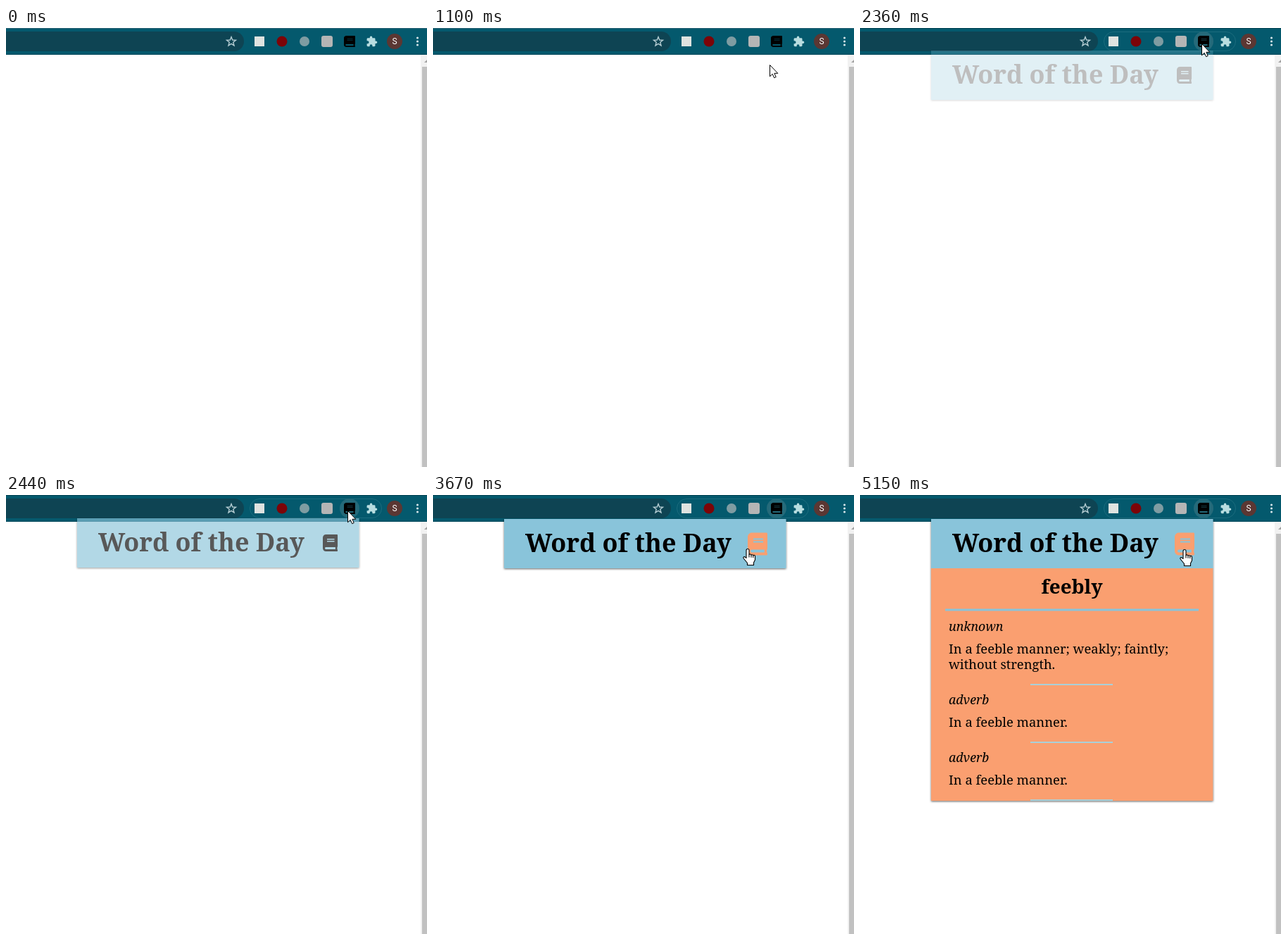
An HTML page for the animation above (8 s loop, 598 px wide and 623 px high).

```html
<!DOCTYPE html>
<html lang="en">
<head>
<meta charset="utf-8">
<title>Word of the Day</title>
<style>
  html, body { margin: 0; width: 100%; height: 100%; overflow: hidden; background: #fff; }
  svg { display: block; width: 598px; height: 623px; }
  .serif { font-family: "Noto Serif", Georgia, serif; }
  .title { font-size: 35.9px; font-weight: 700; }
  .word { font-size: 27.8px; font-weight: 700; text-anchor: middle; }
  .body { font-size: 18.4px; }
  .kind { font-size: 17.8px; font-style: italic; }
  .avatar { font: 12px Roboto, sans-serif; text-anchor: middle; fill: #fff; }
</style>
</head>
<body>
<svg viewBox="0 0 598 623" xmlns="http://www.w3.org/2000/svg">
  <defs>
    <path id="book" fill-rule="evenodd" d="M448 360V24c0-13.3-10.7-24-24-24H96C43 0 0 43 0 96v320c0 53 43 96 96 96h328c13.3 0 24-10.7 24-24v-16c0-7.5-3.5-14.3-8.9-18.7-4.2-15.4-4.2-59.3 0-74.7 5.4-4.3 8.9-11.1 8.9-18.6zM128 128h224v32H128zM128 192h224v32H128zM381.4 448H96c-17.7 0-32-14.3-32-32s14.4-32 32-32h285.4c-1.9 17.1-1.9 46.9 0 64z"/>
    <filter id="shade" x="-5%" y="-20%" width="110%" height="150%">
      <feDropShadow dx="0" dy="1" stdDeviation="1.4" flood-color="#000" flood-opacity=".6"/>
    </filter>
  </defs>

  <!-- page and scrollbar -->
  <rect width="598" height="623" fill="#fff"/>
  <rect x="589" y="38" width="9" height="585" fill="#f1f1f1"/>
  <rect x="591" y="55" width="7" height="568" fill="#c1c1c1"/>
  <path d="M594 49l4-4v4z" fill="#a3a3a3"/>

  <!-- toolbar -->
  <rect width="598" height="38" fill="#04596d"/>
  <rect id="edge" width="598" height="1"/>
  <rect y="37" width="598" height="1" fill="#03485a"/>
  <path d="M0 5H324a14 14 0 0 1 0 28H0z" fill="#0e4453"/>
  <path id="star" fill="none" stroke="#b4ccd2" stroke-width="1.4"/>
  <g id="active">
    <rect x="346.5" y="5.5" width="187" height="27" rx="13.5" fill="none" stroke="#1c6c7e"/>
    <circle cx="488" cy="19" r="14" fill="#256a7a"/>
  </g>
  <rect x="353" y="12" width="14" height="14" fill="#dfe3e0"/>
  <circle cx="392" cy="19" r="7.5" fill="#7c0408"/>
  <circle cx="424" cy="19" r="7" fill="#7f9ca2"/>
  <rect x="448" y="11" width="16" height="16" rx="3" fill="#b5b5b5"/>
  <use href="#book" transform="translate(480 11) scale(.0357 .03125)"/>
  <path d="M484 15.5h9M484 17.5h9" stroke="#000" stroke-opacity=".5"/>
  <path transform="translate(511.2 10.8) scale(.7)" fill="#b8dde0" d="M20.5 11H19V7c0-1.1-.9-2-2-2h-4V3.5a2.5 2.5 0 0 0-5 0V5H4c-1.1 0-2 .9-2 2v3.8h1.5a2.7 2.7 0 0 1 0 5.4H2V20c0 1.1.9 2 2 2h3.8v-1.5a2.7 2.7 0 0 1 5.4 0V22H17c1.1 0 2-.9 2-2v-4h1.5a2.5 2.5 0 0 0 0-5z"/>
  <circle cx="552" cy="19" r="11" fill="#5b3733"/>
  <text class="avatar" x="552" y="23.3">S</text>
  <g fill="#d3e4e8">
    <circle cx="584.5" cy="14" r="1.6"/><circle cx="584.5" cy="19" r="1.6"/><circle cx="584.5" cy="24" r="1.6"/>
  </g>

  <!-- popup -->
  <g id="popup" class="serif">
    <rect id="panel" x="101" y="34" width="400.5" height="70" fill="#89c4da" filter="url(#shade)"/>
    <text class="title" x="131" y="81">Word of the Day</text>
    <use id="icon" href="#book"/>
    <g id="entry">
      <rect x="101" y="104" width="400.5" height="330" fill="#fa9f70"/>
      <text class="word" x="301" y="139.5">feebly</text>
      <rect x="121" y="161.5" width="360" height="3" fill="#89c4da"/>
      <text class="kind" x="126" y="193">unknown</text>
      <text class="body" x="126" y="225">In a feeble manner; weakly; faintly;</text>
      <text class="body" x="126" y="247">without strength.</text>
      <text class="kind" x="126" y="297">adverb</text>
      <text class="body" x="126" y="329">In a feeble manner.</text>
      <text class="kind" x="126" y="379">adverb</text>
      <text class="body" x="126" y="411">In a feeble manner.</text>
      <path d="M242 269h117M242 351h117M242 433h117" stroke="#a9d0d8" stroke-width="2"/>
    </g>
  </g>

  <!-- pointer -->
  <g id="arrow" fill="#fff" stroke="#000" stroke-linejoin="round">
    <path d="M.5 .5V16.8L4.2 13.3 6.6 18.7 9.2 17.6 6.9 12.3H11.8Z"/>
  </g>
  <g id="hand" fill="#fff" stroke="#000" stroke-width="1.1" stroke-linejoin="round">
    <path d="M5 2.5a2 2 0 0 1 4 0V8.5a1.8 1.8 0 0 1 3 .6 1.8 1.8 0 0 1 2.8.8 1.6 1.6 0 0 1 2.7 1.3V16l-2 4v3.5H6.5V20.5L1.2 14c-1.2-1.6.8-3.2 2.3-1.8L5 13.5Z"/>
    <path d="M9 8.5v4M12 9.1v3.6M14.8 9.9v3" fill="none"/>
  </g>
  <circle id="glow" r="15" fill="#f0e000" fill-opacity=".55"/>
</svg>
<script>
const LOOP = 8000;
const $ = id => document.getElementById(id);
const show = (id, on) => $(id).setAttribute('visibility', on ? 'visible' : 'hidden');
const place = (id, x, y, s = 1) => $(id).setAttribute('transform', `translate(${x} ${y}) scale(${s})`);

// pointer runs: start, end, number of held steps, way points
const runs = [
  [280, 1050, 18, [[551, 608], [546, 520], [530, 390], [508, 245], [490, 135], [480, 68]]],
  [1100, 1610, 12, [[478, 52], [478, 30], [481, 12], [483, 6], [485, 16], [485, 22]]],
  [2770, 3010, 6, [[485, 18], [481, 12], [470, 22], [455, 39]]],
  [3060, 3510, 10, [[441, 45], [408, 59], [389, 68], [396, 73], [416, 74], [429, 74]]],
  [3580, 3840, 7, [[434, 75], [447, 76], [457, 77], [461, 77]]]
];
const clicks = [[2020, 2150, 485, 22], [4360, 4490, 460, 77]];

function along(points, p) {
  const f = p * (points.length - 1);
  const i = Math.min(Math.floor(f), points.length - 2);
  const [a, b] = [points[i], points[i + 1]];
  return a.map((v, k) => Math.round(v + (b[k] - v) * (f - i)));
}

function pointer(t) {
  const run = runs.filter(r => t >= r[0]).pop();
  if (!run) return null;
  const [from, to, steps, points] = run;
  const p = Math.min(1, (t - from) / (to - from));
  return along(points, Math.floor(p * (steps - 1) + 1e-6) / (steps - 1));
}

function fade(t) {
  if (t < 2290) return 0;
  const step = Math.floor((t - 2290) / 50);
  return Math.min(1, 0.05 + 0.2 * step);
}

function draw(t) {
  const active = t >= 2020, open = t >= 5150;
  const pos = pointer(t);
  const over = t >= 3580 && pos[0] >= 447;

  show('active', active);
  $('edge').setAttribute('fill', active ? '#0a4657' : '#34697a');

  const alpha = fade(t);
  $('popup').setAttribute('opacity', alpha);
  place('popup', 0, Math.round(-3 * (1 - alpha)));
  $('panel').setAttribute('height', open ? 400 : 70);
  show('entry', open);

  if (over) place('icon', 447, 53.5, 0.0625);
  else place('icon', 450, 57, 0.047);
  $('icon').setAttribute('fill', over ? '#fa9f70' : '#000');

  show('arrow', pos && !over);
  show('hand', over);
  if (pos) {
    place('arrow', pos[0], pos[1]);
    place('hand', pos[0] - 7, pos[1]);
  }

  const click = clicks.find(c => t >= c[0] && t < c[1]);
  show('glow', click);
  if (click) place('glow', click[2], click[3]);
}

const starPoints = [...Array(10).keys()].map(i => {
  const r = i % 2 ? 2.9 : 6.8, a = i * Math.PI / 5;
  return `${(320 + r * Math.sin(a)).toFixed(2)} ${(19.4 - r * Math.cos(a)).toFixed(2)}`;
});
$('star').setAttribute('d', `M${starPoints.join('L')}Z`);

const start = performance.now();
function tick() {
  draw((performance.now() - start) % LOOP);
  requestAnimationFrame(tick);
}
draw(0);
requestAnimationFrame(tick);
</script>
</body>
</html>
```
